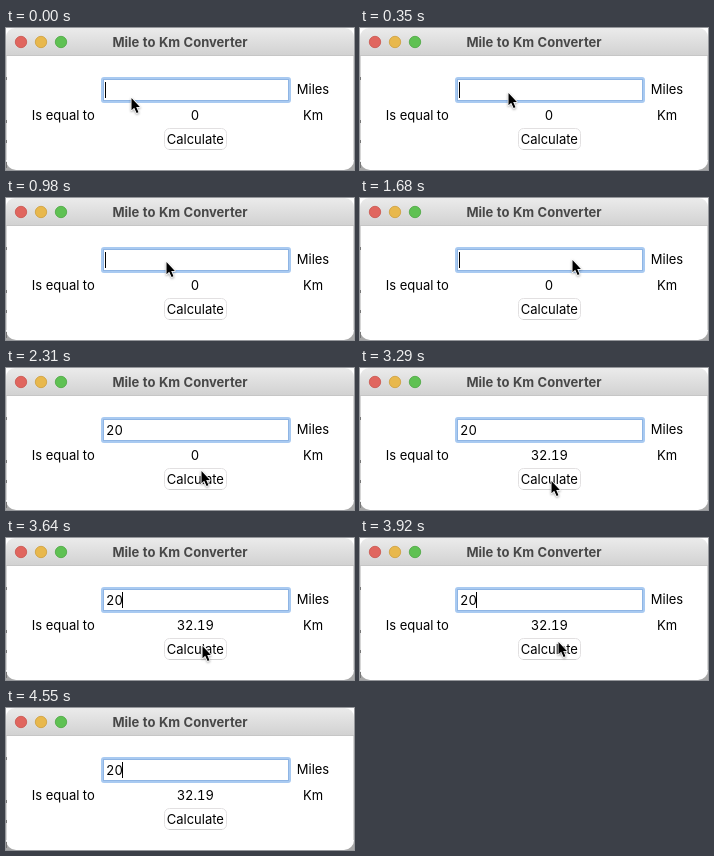
Animation of 348x142 px, one loop 4900 ms. Source, as an HTML page:

```html
<!DOCTYPE html>
<html lang="en">
<head>
<meta charset="utf-8">
<title>Mile to Km Converter</title>
<style>
html, body { margin: 0; width: 100%; height: 100%; overflow: hidden; background: #fff; }
svg { display: block; width: 348px; height: 142px; }
text {
  font: 13px Inter, "Liberation Sans", sans-serif;
  font-variant-numeric: tabular-nums;
  fill: #000;
}
.mid { text-anchor: middle; }
.title { font-weight: 700; fill: #484848; }

/* One tick is 70 ms, 1/70 of the loop */
.caret, .typed, .zero, .result, .pointer { animation: 4.9s step-end infinite; }
.caret { animation-name: caret; }
.typed { animation-name: typed; }
.zero { animation-name: zero; }
.result { animation-name: result; }
.pointer { animation-name: pointer; filter: drop-shadow(0 1px 1px #0005); }

@keyframes caret {
  0% { opacity: 1; transform: translateX(99px); }
  8.571% { opacity: 0; transform: translateX(99px); }
  15.714% { opacity: 1; transform: translateX(99px); }
  28.571% { opacity: 0; transform: translateX(99px); }
  34.285% { opacity: 1; transform: translateX(99px); }
  38.571% { opacity: 1; transform: translateX(116px); }
  47.142% { opacity: 0; transform: translateX(116px); }
  54.285% { opacity: 1; transform: translateX(116px); }
  67.142% { opacity: 0; transform: translateX(116px); }
  72.857% { opacity: 1; transform: translateX(116px); }
  85.714% { opacity: 0; transform: translateX(116px); }
  92.857%, 100% { opacity: 1; transform: translateX(116px); }
}
@keyframes typed {
  0% { opacity: 0; }
  38.571%, 100% { opacity: 1; }
}
@keyframes zero {
  0% { opacity: 1; }
  59.999%, 100% { opacity: 0; }
}
@keyframes result {
  0% { opacity: 0; }
  59.999%, 100% { opacity: 1; }
}
@keyframes pointer {
  0% { transform: translate(124px, 68px); }
  2.857% { transform: translate(130px, 68px); }
  5.714% { transform: translate(138px, 65px); }
  7.142% { transform: translate(147px, 63px); }
  8.571% { transform: translate(151px, 62px); }
  18.571% { transform: translate(153px, 62px); }
  19.999% { transform: translate(159px, 62px); }
  21.428% { transform: translate(190px, 61px); }
  22.857% { transform: translate(211px, 60px); }
  42.857% { transform: translate(211px, 63px); }
  44.285% { transform: translate(208px, 75px); }
  45.714% { transform: translate(201px, 91px); }
  47.142% { transform: translate(194px, 101px); }
  48.571% { transform: translate(192px, 104px); }
  49.999% { transform: translate(191px, 106px); }
  51.428% { transform: translate(190px, 107px); }
  52.857% { transform: translate(190px, 108px); }
  54.285% { transform: translate(190px, 111px); opacity: 1; }
  72.857% { transform: translate(192px, 108px); }
  74.285% { transform: translate(195px, 106px); }
  75.714% { transform: translate(196px, 105px); }
  77.142% { transform: translate(197px, 104px); }
  78.571% { transform: translate(197px, 103px); }
  80% { transform: translate(197px, 102px); opacity: 1; }
  81.428%, 100% { transform: translate(197px, 102px); opacity: 0; }
}
</style>
</head>
<body>
<svg viewBox="0 0 348 142">
  <defs>
    <linearGradient id="bar" x2="0" y2="1">
      <stop stop-color="#ebebeb"/>
      <stop offset="1" stop-color="#d2d2d2"/>
    </linearGradient>
  </defs>

  <!-- window -->
  <path d="M0 130V142H348V130Z" fill="#a8a8a8"/>
  <path d="M0 27H348V132a10 10 0 0 1-10 10H10a10 10 0 0 1-10-10Z" fill="#fff"/>
  <path d="M0 27V9a9 9 0 0 1 9-9H339a9 9 0 0 1 9 9V27Z" fill="url(#bar)"/>
  <path d="M0 27.5H348" stroke="#c6c6c6"/>
  <path d="M.5 28V132M347.5 28V132" stroke="#d6d6d6"/>
  <path d="M.5 49v3M.5 92v3M.5 112v3M.5 134v6" stroke="#777"/>
  <g stroke-width=".8">
    <circle cx="15" cy="14" r="5.7" fill="#e0665f" stroke="#c9534c"/>
    <circle cx="35" cy="14" r="5.7" fill="#e8b84d" stroke="#cf9f3a"/>
    <circle cx="55" cy="14" r="5.7" fill="#5fc153" stroke="#4ba640"/>
  </g>
  <text class="mid title" x="174" y="19">Mile to Km Converter</text>

  <!-- form -->
  <rect x="96.5" y="50.5" width="187" height="23" rx="1.5" fill="#fff" stroke="#a9caf1" stroke-width="3"/>
  <rect x="97.5" y="51.5" width="185" height="21" fill="none" stroke="#8fb5e4"/>
  <text class="typed" x="100" y="67">20</text>
  <rect class="caret" y="54" width="1" height="16"/>
  <text class="mid" x="307" y="66">Miles</text>
  <text class="mid" x="57.3" y="92">Is equal to</text>
  <text class="mid zero" x="189" y="92">0</text>
  <text class="mid result" x="189.3" y="92">32.19</text>
  <text class="mid" x="307" y="92">Km</text>
  <rect x="158.5" y="100.5" width="62" height="21" rx="5" fill="#fff" stroke="#e2e0e1"/>
  <path d="M163 121.5H216" stroke="#d0d0d0"/>
  <text class="mid" x="189.3" y="115.5">Calculate</text>

  <path class="pointer" d="M1.5 2V14.2L4.2 11.7L6.6 17L8.5 16.2L6.2 11H9.9Z"
    fill="#000" stroke="#fff" stroke-width="1.6" stroke-linejoin="round" paint-order="stroke"/>
</svg>
</body>
</html>
```
